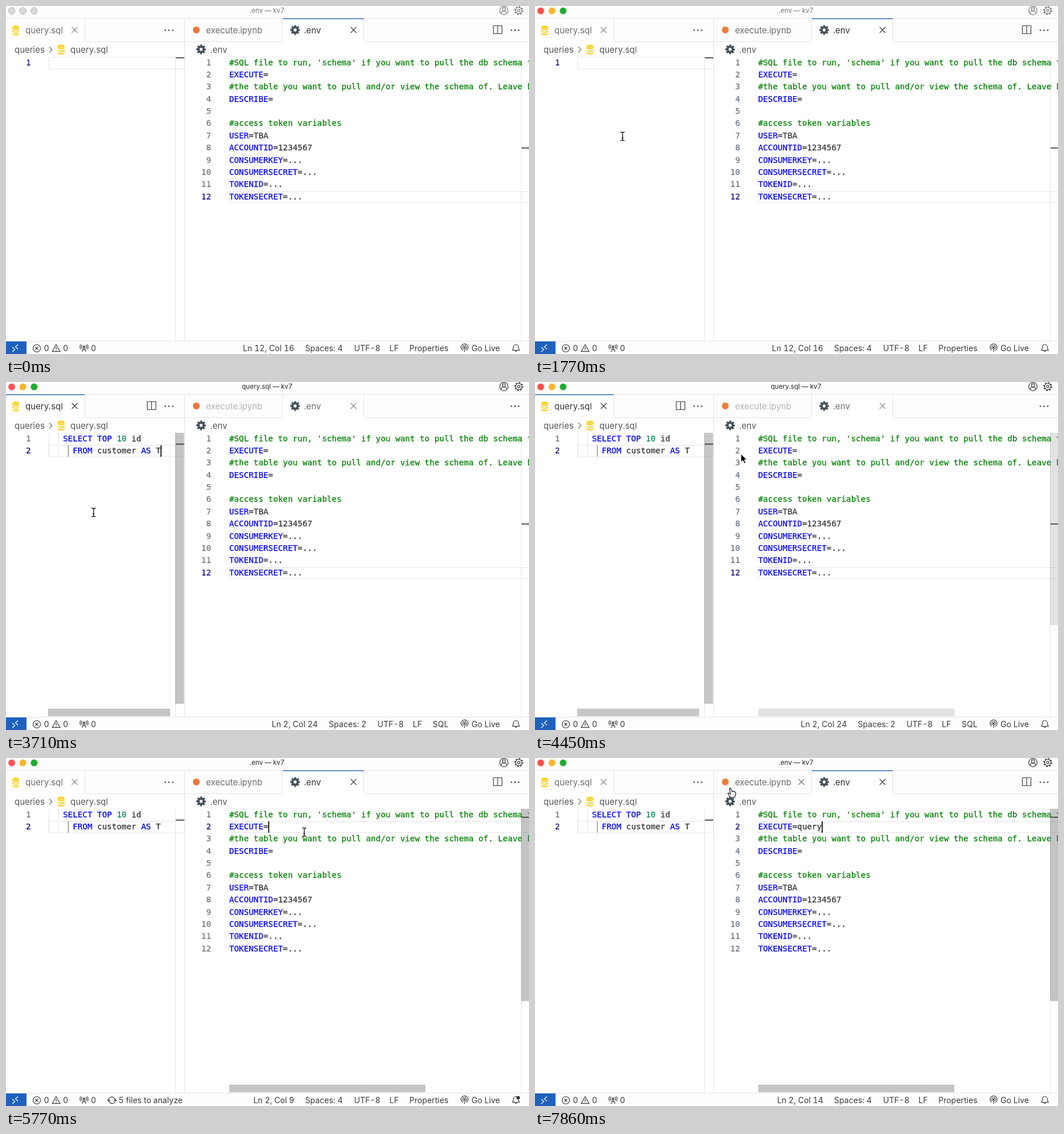
These frames come from a looping animation (918 by 610 pixels, 8 s). An HTML page:

```html
<!DOCTYPE html>
<html lang="en">
<head>
<meta charset="utf-8">
<title>Editor</title>
<style>
  html, body { margin: 0; width: 100%; height: 100%; overflow: hidden; background: #fff; }
  svg { display: block; width: 100vw; height: 100vh; }
  text { font: 14.1px Inter, "Open Sans", sans-serif; font-feature-settings: "tnum"; fill: #3b3b3b; white-space: pre; }
  .title { font-size: 11.6px; text-anchor: middle; fill: #777; }
  .tab { font-size: 15px; fill: #6b6b6b; }
  .crumb { font-size: 15px; fill: #555; }
  .code { font: 14.25px "DejaVu Sans Mono", "Liberation Mono", monospace; color: #333; }
  .code, .code tspan { fill: currentColor; stroke: currentColor; stroke-width: .25; }
  .num { text-anchor: end; color: #6e7681; }
  .num.on { color: #171184; }
  .end { text-anchor: end; }
  .key { color: #00f; }
  .note { color: #008000; }
  .digit { color: #098658; }
  .bar { fill: #fdfdfd; }
  .sheet { fill: #fff; }
  .line { fill: none; stroke: #e4e4e4; }
  .icon { fill: none; stroke: #3b3b3b; stroke-width: 1.2; }
  .dim { stroke: #777; }
  .scroll { fill: #646464; fill-opacity: .38; }
  .accent { fill: #1f62bd; }
  .mark { fill: #333; }
  .light { fill: #d9d9d9; stroke: #b8b8b8; }
  .awake .light { fill: var(--c); stroke: none; }
  .focused .title { fill: #262626; }
  .window .icon { stroke: #777; }
  .focused .window .icon { stroke: #3b3b3b; }
  .left .query, .right .env { fill: #333; }
  .left .execute { fill: #b4b4b4; }
  .right .onLeft, .left .onRight { display: none; }
  .left .envClose, .right .queryClose { stroke: #8a8a8a; }
</style>
</head>
<body>
<svg id="stage" viewBox="0 0 918 610" preserveAspectRatio="none"></svg>
<script>
const LOOP = 8000, ADVANCE = 8.58, LEADING = 21.36;
const stage = document.getElementById('stage');

const names = (cls, id) => `class="${cls}"` + (id ? ` id="${id}"` : '');
const text = (x, y, str, cls = '', id) => `<text x="${x}" y="${y}" ${names(cls, id)}>${str}</text>`;
const rect = (x, y, w, h, cls, id) => `<rect x="${x}" y="${y}" width="${w}" height="${h}" ${names(cls, id)}/>`;
const circle = (x, y, r, cls = 'icon', more = '') => `<circle cx="${x}" cy="${y}" r="${r}" class="${cls}" ${more}/>`;
const path = (d, cls = 'icon') => `<path d="${d}" class="${cls}"/>`;
const span = (cls, str) => `<tspan class="${cls}">${str}</tspan>`;
const baseline = row => Math.floor(82.8 + row * LEADING);

const close = (x, cls = '') => path(`M${x - 5} 37l10 10m0-10l-10 10`, 'icon ' + cls);
const ellipsis = x => [-6.5, 0, 6.5].map(d => circle(x + d, 42.5, 1.2, 'mark')).join('');
const split = x => path(`M${x - 7.5} 34.5h15v14h-15zM${x} 34.5v14`);
const database = (x, y) => `<g transform="translate(${x} ${y})" fill="#f8d53f">
  <ellipse cy="-5.5" rx="6.3" ry="2.9"/>
  ${[-4.2, .2, 4.6].map(top => `<path d="M-6.3 ${top}q6.3 4 12.6 0v2.4q-6.3 4.4-12.6 0z"/>`).join('')}</g>`;
const gear = (x, y) => `<g fill="none" stroke="#43535d">
  ${circle(x, y, 4.7, '', 'stroke-width="4"')}
  ${circle(x, y, 7.2, '', 'stroke-width="2.7" stroke-dasharray="3.2 2.455" stroke-dashoffset="1.6"')}</g>`;

const backdrop = rect(0, 0, 918, 63, 'bar') + rect(0, 588, 918, 22, 'bar') +
  rect(0, 22, 138, 42, 'sheet') + rect(486, 22, 142, 42, 'sheet');

const trafficLights = ['#ff5250', '#fdb52a', '#1fae2f'].map((c, i) =>
  circle(10 + i * 19.7, 8.5, 5.9, 'light', `style="--c:${c}"`)).join('');

const windowBar = `<g class="window">${trafficLights}
  ${text(458.5, 12, '', 'title', 'title')}
  ${circle(874, 8, 7.3)}${circle(874, 5.8, 2.7)}${path('M869 13q0-4 5-4t5 4')}
  ${circle(900, 8, 5.5)}${circle(900, 8, 2.2)}
  ${circle(900, 8, 6.8, 'icon', 'style="stroke-width:2" stroke-dasharray="2.6 2.74"')}</g>`;

const tabs = `
  ${path('M0 21.5H918M138.5 22V62.5H313M314 62.5H485.5V22M627.5 22V62.5H918M313.5 22V587', 'line')}
  ${rect(0, 21.7, 138, 1.3, 'accent onLeft')}${rect(486, 21.7, 142, 1.3, 'accent onRight')}
  ${database(17, 42.5)}${text(34, 48, 'query.sql', 'tab query')}${close(120.5, 'queryClose')}
  <g class="onLeft">${split(255.5)}</g>${ellipsis(286)}
  <circle cx="334" cy="42" r="6" fill="#ee7a3b"/>${text(351, 48, 'execute.ipynb', 'tab execute')}
  <g id="hoverClose">${close(467.5, 'dim')}</g>
  ${gear(507.5, 42)}${text(523, 48, '.env', 'tab env')}${close(610, 'envClose')}
  <g class="onRight">${split(863)}</g>${ellipsis(893.5)}
  ${text(15, 82, 'queries', 'crumb')}${path('M76 71.5l4.8 5-4.8 5', 'icon dim')}
  ${database(96.5, 76)}${text(113, 82, 'query.sql', 'crumb')}
  ${gear(342.5, 76)}${text(358.5, 82, '.env', 'crumb')}`;

const setting = (name, value) => span('key', name) + '=' + value;
const envLines = [
  span('note', "#SQL file to run, 'schema' if you want to pull the db schema to"),
  setting('EXECUTE', '<tspan id="typed"></tspan>'),
  span('note', '#the table you want to pull and/or view the schema of. Leave blank'),
  setting('DESCRIBE', ''),
  '',
  span('note', '#access token variables'),
  setting('USER', 'TBA'),
  setting('ACCOUNTID', '1234567'),
  ...['CONSUMERKEY', 'CONSUMERSECRET', 'TOKENID', 'TOKENSECRET'].map(k => setting(k, '...'))
];

const envPane = `
  ${path('M904.5 89V587', 'line')}${rect(392, 0, 540, 19, 'line', 'envRow')}
  ${envLines.map((line, i) => text(360, baseline(i + 1), i + 1, 'code num', 'env' + (i + 1)) +
    text(391.7, baseline(i + 1), line, 'code')).join('')}
  <g id="envScroll">${rect(904, 89, 14, 337, 'scroll')}${rect(392, 572.5, 344, 13.5, 'scroll')}</g>
  ${rect(905, 0, 13, 1.6, 'mark', 'envMark')}`;

const queryPane = `
  ${path('M297.5 89V587', 'line')}${rect(75, 0, 238, 20, 'line', 'queryRow')}
  ${text(43.5, baseline(1), 1, 'code num', 'query1')}
  <g id="pasted">
    ${path('M75.5 89V131M92.5 89V131', 'line')}${path('M109.5 111V131', 'icon dim')}
    ${text(43.5, baseline(2), 2, 'code num on')}
    ${text(100, baseline(1), span('key', 'SELECT TOP ') + span('digit', '10') + ' id', 'code')}
    ${text(100 + 2 * ADVANCE, baseline(2), span('key', 'FROM') + ' customer ' + span('key', 'AS') + ' T', 'code')}
  </g>
  <g id="queryScroll">${rect(297, 89, 15.5, 475, 'scroll')}${rect(74, 572.5, 214, 13.5, 'scroll')}</g>
  ${rect(298, 0, 15, 1.6, 'mark', 'queryMark')}`;

const sideStatus = (side, x, items) => `<g class="${side}">
  ${text(x, 605, '', 'end', side + 'Pos')}${items.map(([left, label]) => text(left, 605, label)).join('')}</g>`;

const statusBar = `
  ${path('M0 587.5H918', 'line')}${rect(0, 588, 36, 22, 'accent')}
  <path d="M11 598l4.5 4-4.5 4M21 593.5l-4.5 4 4.5 4" fill="none" stroke="#fff" stroke-width="1.2"/>
  ${circle(54, 600, 6.5)}${path('M51.5 597.5l5 5m0-5l-5 5')}
  ${text(66.5, 605, '0')}${path('M88 593.5l6.8 12.2H81.2zM88 598v4m0 1v1.2')}${text(100, 605, '0')}
  ${path('M137 597l-3.5 9M137 597l3.5 9M135 602.5h4M133.5 594q-2 3 0 6m7-6q2 3 0 6M131.3 593q-3 4 0 8.5m11.4-8.5q3 4 0 8.5')}
  ${circle(137, 597, 1.3)}${text(149, 605, '0')}
  <g id="analysis">
    <g id="sync">${path('M180.2 601a5.6 5.6 0 0 1 9.5-5l1.5 1.5M191.8 599a5.6 5.6 0 0 1-9.5 5l-1.5-1.5M178 599l2.3 2.8 2.5-2.5M194 601l-2.3-2.8-2.5 2.5')}</g>
    ${text(197.5, 605, '5 files to analyze')}${circle(899, 595.5, 3, 'mark')}
  </g>
  ${sideStatus('onRight', 506, [[525, 'Spaces: 4'], [611, 'UTF-8'], [673, 'LF'], [708, 'Properties']])}
  ${sideStatus('onLeft', 547.5, [[566.5, 'Spaces: 2'], [652, 'UTF-8'], [714, 'LF'], [749, 'SQL']])}
  ${path('M802 604a6.2 6.2 0 1 1 6 0M803 601.5a3.3 3.3 0 1 1 4 0M805 600v6.5')}${circle(805, 599, 1.4, 'mark')}
  ${text(817, 605, 'Go Live')}
  ${path('M889 603.5q1.5-1.5 1.5-5.5a4.5 4.5 0 0 1 9 0q0 4 1.5 5.5zM893 604q2 3.5 4 0')}`;

// Every pointer shape has its hotspot at 0,0.
const pointers = `<g id="pointer">
  <path id="arrow" d="M0 0V14.5L3.3 11.5 5.8 16.8 8.3 15.7 5.9 10.5H10.3Z" fill="#000" stroke="#fff"/>
  <path id="beam" d="M-3.5-7.5Q0-7.5 0-5.5Q0-7.5 3.5-7.5M0-6V6M-3.5 7.5Q0 7.5 0 5.5Q0 7.5 3.5 7.5M-1.5 2.5h3" fill="none" stroke="#111" stroke-width="1.3"/>
  <path id="hand" d="M-1.5 1Q-1-1 1 .5L3 6 5 5 7 6 9 7 9 11 7.5 16H0L-4 10Q-5 8-2.5 8.5L0 10Z" fill="#fff" stroke="#111" stroke-width="1.2"/>
</g>`;

stage.innerHTML = backdrop + windowBar + tabs + queryPane + envPane +
  rect(0, 0, 1.7, 20, '', 'caret') + statusBar + pointers;

const $ = Object.fromEntries([...stage.querySelectorAll('[id]')].map(el => [el.id, el]));

// Step tracks: each stop holds until the next one.
const pointerTrack = [
  [0], [290, 'arrow', 870, 440], [440, 'arrow', 785, 415], [590, 'arrow', 565, 350],
  [740, 'arrow', 330, 281], [880, 'arrow', 195, 241], [1030, 'arrow', 152.5, 228],
  [1770, 'beam', 153.7, 228.5], [4150, 'beam', 185, 212], [4300, 'beam', 275, 165],
  [4450, 'arrow', 361.5, 126], [4600, 'beam', 444, 119], [4750, 'beam', 500, 126],
  [4890, 'beam', 518, 129], [5030, 'beam', 523.5, 130], [6360],
  [7410, 'beam', 523.5, 130], [7560, 'beam', 478, 111], [7710, 'arrow', 385, 72], [7860, 'hand', 343, 53]
];
const caretTrack = [[0, 0], [1920, 1], [2370, 0], [2670, 1], [3120, 0], [3710, 1], [4150, 0],
  [5470, 1], [6060, 0], [6360, 1], [7410, 0], [7860, 1]];
const typedTrack = [[0, 0], [6360, 1], [6510, 2], [6660, 4], [6810, 5]];
const queryFade = [[0, 0], [2670, .68], [2820, 1], [4450, .95], [4600, .75], [4750, .5], [4890, .28], [5030, .1], [5180, 0]];
const envFade = [[0, 0], [4450, .5], [4600, 1]];

const at = (track, t) => track.findLast(stop => stop[0] <= t);
const show = (el, on) => el.style.display = on ? '' : 'none';
const move = (el, x, y) => el.setAttribute('transform', `translate(${x} ${y})`);

function draw(t) {
  const onLeft = t >= 1920 && t < 5470, pasted = t >= 2670, edited = t >= 5470;
  const typed = at(typedTrack, t)[1];

  stage.setAttribute('class', [onLeft ? 'left' : 'right', t >= 1770 && 'awake', t >= 1920 && 'focused'].filter(Boolean).join(' '));
  $.title.textContent = (onLeft ? 'query.sql' : '.env') + ' — kv7';
  $.typed.textContent = 'query'.slice(0, typed);
  $.onLeftPos.textContent = pasted ? 'Ln 2, Col 24' : 'Ln 1, Col 1';
  $.onRightPos.textContent = edited ? `Ln 2, Col ${9 + typed}` : 'Ln 12, Col 16';

  show($.pasted, pasted);
  show($.hoverClose, t >= 7860);
  show($.analysis, t >= 5620 && t < 6360);
  $.sync.setAttribute('transform', `rotate(${(t - 5770) * .24} 186 600)`);
  $.queryScroll.style.opacity = at(queryFade, t)[1];
  $.envScroll.style.opacity = at(envFade, t)[1];

  move($.envRow, 0, edited ? 111.5 : 325.5);
  move($.queryRow, 0, pasted ? 111 : 90);
  move($.envMark, 0, edited ? 103 : 248);
  move($.queryMark, 0, pasted ? 108 : 90);
  $.env12.classList.toggle('on', !edited);
  $.env2.classList.toggle('on', edited);
  $.query1.classList.toggle('on', !pasted);

  const caretX = !onLeft ? 392 + (8 + typed) * ADVANCE : pasted ? 100 + 20 * ADVANCE : 74.5;
  move($.caret, caretX - .3, onLeft && !pasted ? 90 : 111);
  show($.caret, at(caretTrack, t)[1]);

  const [, shape, x, y] = at(pointerTrack, t);
  for (const name of ['arrow', 'beam', 'hand']) show($[name], name === shape);
  if (shape) move($.pointer, x, y);
}

(function tick() {
  draw(performance.now() % LOOP);
  requestAnimationFrame(tick);
})();
</script>
</body>
</html>
```
